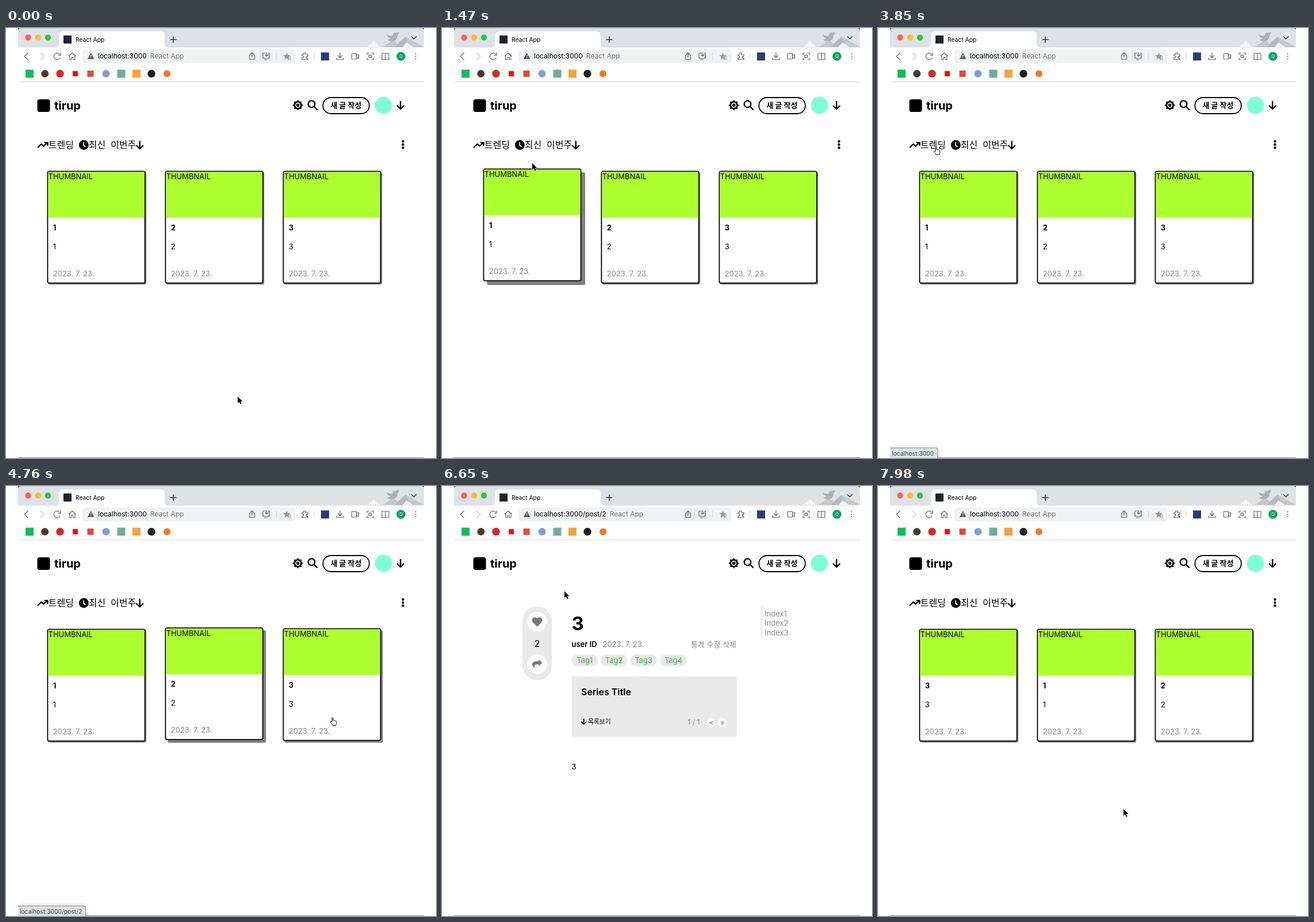
Write an HTML page that moves like this. It is 748 by 748 pixels and loops after 8000 ms.

```html
<!DOCTYPE html>
<html lang="ko">
<head>
<meta charset="utf-8">
<title>React App</title>
<style>
  html, body { margin: 0; width: 100%; height: 100%; overflow: hidden; background: #fff; }
  body, svg { font-family: Inter, "Noto Sans CJK KR", sans-serif; }
  svg { position: absolute; left: 0; top: 0; }
  text { font-size: 13px; }
  .bold { font-weight: 700; }
  .semi { font-weight: 600; }
  .muted { fill: #868686; }
  .panel { fill: #e9e9e9; }
  .green { fill: #3db43d; }
  .mid { text-anchor: middle; }
  .line { fill: none; stroke: #000; stroke-width: 2.3; stroke-linecap: round; stroke-linejoin: round; }
  .tool { fill: none; stroke: #5f6368; stroke-width: 1.2; stroke-linecap: round; stroke-linejoin: round; }
  .nav text { font-size: 16px; }
  #status {
    position: absolute; left: 21px; top: 730px; height: 17px; padding: 0 6px 0 3px;
    border: 1px solid #8d9197; border-left: 0; border-bottom: 0; border-radius: 0 4px 0 0;
    background: #dee1e6; box-shadow: 0 0 7px #0003; clip-path: inset(-12px -16px 0 0);
    font-size: 10.35px; line-height: 18px; color: #3c4043; white-space: nowrap;
  }
</style>
</head>
<body>
<svg width="748" height="748" viewBox="0 0 748 748">
  <defs>
    <path id="down" class="line" d="M0-6.5V6.5M-5.5 1L0 6.5L5.5 1"/>
  </defs>

  <!-- tab strip -->
  <path d="M21 0H727V34H21z" fill="#dee1e6"/>
  <path d="M21 .5H727" stroke="#c9ccd1"/>
  <path d="M21 0h4q-4 0-4 4zM727 0h-4q4 0 4 4z" fill="#444"/>
  <path d="M655 33L673 21L681 27L695 15L711 24L727 33z" fill="#c5c8cd"/>
  <path d="M676 33L695 16L704 33z" fill="#b5b8be"/>
  <path d="M628 33L640 23L651 33zM690 33L697 25L708 33z" fill="#f5f6f7"/>
  <path d="M662 11q6 4 11 2q0-5 5-5l6-1q-1 4-3 7q-1 9-10 9q-6 0-8-3q4 0 6-2q-6-2-7-7z" fill="#adb0b5"/>
  <circle cx="38.5" cy="16.5" r="5.2" fill="#ff5f57"/>
  <circle cx="56" cy="16.5" r="5.2" fill="#febc2e"/>
  <circle cx="73" cy="16.5" r="5.2" fill="#28c840"/>
  <path d="M85 34q7 0 7-7V13q0-7 7-7H269q7 0 7 7V27q0 7 7 7z" fill="#fff"/>
  <rect x="100" y="13" width="14" height="14" fill="#20232a"/>
  <text x="121" y="23.6" style="font-size:10.3px">React App</text>
  <path class="tool" stroke="#333" d="M286 20.3h10M291 15.3v10M705.5 15l4 4l4-4" style="stroke:#333;stroke-width:1.5"/>

  <!-- toolbar -->
  <rect x="133" y="37.5" width="371" height="24" rx="6" fill="#f0f1f3"/>
  <g class="tool">
    <path d="M38 43.5L32 49.3L38 55M93.5 46A5.7 5.7 0 1 0 94 52M91 47.5h4v-4.500M109.500 48.500L115.200 43.500L121 48.500M110.800 48V55h3v-4h3v4h3V48"/>
    <path d="M60.500 43.500L66.500 49.300L60.500 55" stroke="#c4c7cb"/>
    <path d="M426 47h-2.500v7.500h9V47H430M428 51v-8l-2.500 2.500M428 43l2.500 2.500M452 43.500h-5v9h11v-9h-1.500M449.500 55h5M453.500 43v6l-2.500-2.500M453.500 49l2.500-2.500"/>
    <path d="M515 46h3q-1-3 1.500-3t1.500 3h4v3.500q-3-1-3 1.500t3 1.500V55H515v-3q3 0 3-1.800T515 48.500z"/>
    <path d="M581 43v8M577.500 48l3.500 3.500l3.500-3.500M575 52v3h12v-3"/>
    <path d="M601.500 44.500h8v9.500h-8zM609.500 48l4-2v7l-4-2"/>
    <path d="M628 46.500v-3h3M636 43.500h3v3M639 52v3h-3M631 55h-3v-3"/>
    <circle cx="633.500" cy="49.300" r="2.500"/>
    <path d="M654 44h12v11h-12zM660 44v11"/>
  </g>
  <path d="M470.500 43v12M535.500 43v12" stroke="#d5d7da"/>
  <path d="M147.700 43.500L153.300 54H142z" fill="#505357"/>
  <path d="M147.700 47v3M147.700 51.300v1.300" stroke="#fff" stroke-width="1.200"/>
  <path d="M488.500 43l1.800 4l4.500.4l-3.400 3l1 4.500l-3.900-2.500l-3.900 2.500l1-4.500l-3.400-3l4.500-.4z" fill="#96999d"/>
  <path d="M490 50h6M490 52.500h6M490 55h6" stroke="#96999d"/>
  <rect x="548" y="42.500" width="14" height="14" fill="#2b3a7c"/>
  <circle cx="687" cy="49.300" r="7.800" fill="#0ba360"/>
  <text class="mid" x="687" y="52.300" fill="#fff" style="font-size:8px">Q</text>
  <g fill="#5f6368"><circle cx="712.500" cy="45" r="1"/><circle cx="712.500" cy="49.300" r="1"/><circle cx="712.500" cy="53.500" r="1"/></g>
  <text y="53.300" x="160" style="font-size:12px"><tspan id="url"></tspan><tspan dx="6" fill="#777">React App</tspan></text>

  <!-- bookmarks -->
  <rect x="34" y="72.500" width="14" height="14" fill="#0abf5b"/>
  <circle cx="67.700" cy="79.500" r="6.500" fill="#4b3a29"/>
  <circle cx="94" cy="79.500" r="6.700" fill="#d62828"/>
  <rect x="116" y="75" width="9" height="9" fill="#f00"/>
  <rect x="141.500" y="74" width="11" height="11" fill="#e24a3b"/>
  <circle cx="174" cy="79.500" r="6.500" fill="#7f9ed0"/>
  <rect x="193.500" y="72.500" width="14" height="14" fill="#74aa9c"/>
  <rect x="220" y="72.500" width="14" height="14" fill="#f5a33a"/>
  <circle cx="253" cy="79.500" r="6.700" fill="#1b1f23"/>
  <circle cx="280" cy="79.500" r="6" fill="#f37726"/>
  <path d="M21 93.700H727" stroke="#dcdee1" stroke-width="1.200"/>
  <path d="M21 747.500H727" stroke="#8a8a8a"/>

  <!-- site header -->
  <rect x="54.500" y="124" width="22" height="22" rx="4"/>
  <text class="bold" x="84" y="142" style="font-size:20px">tirup</text>
  <g id="sun" transform="translate(507.700 134.300)">
    <circle r="5.700" fill="none" stroke="#000" stroke-width="2.500"/><circle r="2.800"/>
  </g>
  <g class="line"><circle cx="531.500" cy="132.300" r="5.800"/><path d="M536 136.800L541 141.800"/></g>
  <rect x="551.300" y="121" width="80.700" height="28" rx="14" fill="none" stroke="#000" stroke-width="1.800"/>
  <text class="bold mid" x="591.500" y="139.300">새 글 작성</text>
  <circle cx="656.500" cy="134.500" r="15" fill="#7fffd4"/>
  <use href="#down" x="686.300" y="134.500"/>

  <g id="home">
    <g class="nav">
      <path class="line" d="M55.500 207.500L61.500 201.800L65.500 205.300L72 199.500M67.500 199.300H72.500V204"/>
      <text x="73.700" y="208.600">트렌딩</text>
      <circle cx="135.300" cy="203.500" r="8.500"/>
      <path d="M135 198.500V204L138.500 206.500" fill="none" stroke="#fff" stroke-width="1.600"/>
      <text x="143.700" y="208.600">최신</text>
      <text x="182" y="208.600">이번주</text>
      <use href="#down" x="232.800" y="203.700"/>
      <circle cx="690.500" cy="197.300" r="2.200"/><circle cx="690.500" cy="202.800" r="2.200"/><circle cx="690.500" cy="208.300" r="2.200"/>
    </g>
    <g id="cards"></g>
  </g>

  <g id="post">
    <rect class="panel" x="140" y="209.500" width="51" height="128" rx="25.500"/>
    <g fill="#fff"><circle cx="165.500" cy="236" r="17.200"/><circle cx="165.500" cy="309.800" r="17.200"/></g>
    <path d="M165.500 244.500l-7.500-7.500c-3-4 0-9 4-8.500q2.500.3 3.500 2.200q1-1.900 3.500-2.200c4-.5 7 4.500 4 8.500z" fill="#777"/>
    <path d="M168 301.500l6.500 6l-6.500 6v-3.500q-6-.5-7 2.500q-.5 2 .8 4.500q-5.300-3-4.800-7.500q1-5 11-4.700z" fill="#777"/>
    <text id="likes" class="mid" x="165.500" y="279.500" style="font-size:16px"></text>
    <text class="bold" x="225.500" y="251" style="font-size:33px">3</text>
    <text class="semi" x="225.500" y="280">user ID</text>
    <text class="muted" x="279.500" y="280">2023. 7. 23.</text>
    <text class="muted" x="433" y="280">통계 수정 삭제</text>
    <g id="tags"></g>
    <rect class="panel" x="225.500" y="330.700" width="287" height="105.500" rx="4"/>
    <text class="semi" x="242" y="364" style="font-size:16px">Series Title</text>
    <use href="#down" transform="translate(246.700 410) scale(.68)"/>
    <text x="254" y="413.700" style="font-size:10.800px">목록보기</text>
    <text class="muted" x="427.500" y="415" style="font-size:12px">1 / 1</text>
    <g fill="#fff"><circle cx="468.500" cy="411.300" r="7.700"/><circle cx="487.800" cy="411.300" r="7.700"/></g>
    <g class="bold green mid"><text x="468.500" y="415" style="font-size:11px">&lt;</text><text x="487.800" y="415" style="font-size:11px">&gt;</text></g>
    <text x="225.500" y="492.500">3</text>
    <path d="M556 209.500V266.500" stroke="#dcdcdc" stroke-width="1.700"/>
    <g class="muted"><text x="561" y="227">Index1</text><text x="561" y="243.300">Index2</text><text x="561" y="259.600">Index3</text></g>
  </g>

  <g id="cursor">
    <path id="arrow" d="M0 0V11.500L2.700 9.200L4.600 13.500L6.800 12.500L5 8.400H8.500z" stroke="#fff" stroke-width="1.300" paint-order="stroke"/>
    <path id="hand" transform="translate(-5 -.5)" fill="#fff" stroke="#000" d="M4 1.200c0-1 2-1 2 0v4.300c.3-.8 1.800-.7 2 .1c.5-.5 1.800-.3 1.900.5c.7-.4 1.900-.1 1.900.9v3.200c0 1.500-1 2-1 3.800H5.300c-.4-1.600-2.600-3.400-3.800-5.200c-.8-1.200.7-2 1.600-1.100L4 8.600z"/>
  </g>
</svg>
<div id="status"></div>

<script>
const LOOP = 8000, STEP = 70, HOST = 'localhost:3000';
const $ = id => document.getElementById(id);
const clamp = v => Math.max(0, Math.min(1, v));
const easeOut = p => 1 - (1 - clamp(p)) ** 2;
const within = (t, spans) => spans.some(([from, to]) => t >= from && t < to);
const show = (el, on) => { el.style.display = on ? '' : 'none'; };

// time, x, y of the pointer tip
const route = [
  [0, 403, 641], [490, 403, 641], [560, 408, 630], [630, 414, 619], [700, 414, 619],
  [840, 400, 560], [980, 320, 430], [1120, 200, 360], [1400, 165, 280], [1470, 157, 235],
  [1540, 160, 214], [1750, 340, 320], [1960, 540, 330], [2170, 570, 300], [2240, 570, 300],
  [2590, 190, 208], [3080, 152, 210], [3640, 101, 207], [3850, 101, 207], [4200, 150, 300],
  [4480, 330, 380], [4690, 475, 406], [4760, 568, 403], [4970, 568, 403], [5180, 584, 401],
  [5460, 520, 370], [5950, 163, 232], [6370, 163, 232], [6650, 213, 183], [6930, 88, 138],
  [7070, 88, 138], [7280, 140, 225], [7420, 230, 320], [7560, 350, 460], [7700, 427, 562], [LOOP, 427, 562]
];
const handSpans = [[1050, 1470], [1700, 2310], [2590, 3920], [4130, 5040], [5950, 6400], [6860, 7140], [7350, 7560]];
const hovers = [
  [[1050, 1480], [4150, 4360], [7320, 7440]],
  [[1700, 1890], [4360, 4700], [7440, 7540]],
  [[1890, 2350], [4720, 4970]]
];
const statuses = [
  [2660, 4200, ''], [4200, 4410, '/post/0'], [4410, 4690, '/post/1'], [4690, 5480, '/post/2'],
  [6930, 7350, ''], [7350, 7490, '/post/2'], [7490, 7800, '/post/0']
];
const POST_OPEN = 4970, POST_CLOSE = 7070, LIKES = [6090, 6230];

$('sun').innerHTML += Array.from({ length: 8 }, (_, i) =>
  `<path d="M-2.600-6L0-9.300L2.600-6z" transform="rotate(${i * 45})"/>`).join('');

$('tags').innerHTML = [225.5, 275.5, 327, 379].map((x, i) => {
  const w = i ? 47 : 45.5;
  return `<rect class="panel" x="${x}" y="293" width="${w}" height="20.500" rx="10.250"/>
    <text class="green mid" x="${x + w / 2}" y="308">Tag${i + 1}</text>`;
}).join('');

const cards = [0, 1, 2].map(i => {
  const card = document.createElementNS('http://www.w3.org/2000/svg', 'g');
  card.innerHTML = `<rect class="shadow" width="171" height="196" rx="3" fill="#808080"/>
    <rect x=".900" y=".900" width="169.200" height="194.200" rx="2.500" fill="#fff" stroke="#000" stroke-width="1.800"/>
    <path d="M1.800 1.800H169.200V81.500H1.800z" fill="#adff2f"/>
    <text x="2" y="14.700">THUMBNAIL</text>
    <text class="num bold" x="10.300" y="103.500"></text>
    <text class="num" x="10.300" y="136.500"></text>
    <text class="muted" x="10.300" y="183.300">2023. 7. 23.</text>`;
  $('cards').append(card);
  return { card, shadow: card.querySelector('.shadow'), nums: card.querySelectorAll('.num'), x: 71.5 + 205 * i };
});

function liftAt(t, spans) {
  return Math.max(...spans.map(([enter, leave]) =>
    easeOut((Math.min(t, leave) - enter) / 300) * (1 - easeOut((t - leave) / 300))));
}

function pointerAt(t) {
  const next = Math.max(1, route.findIndex(([time]) => time > t));
  const [t0, x0, y0] = route[next - 1], [t1, x1, y1] = route[next];
  const p = (t - t0) / (t1 - t0);
  return [x0 + (x1 - x0) * p, y0 + (y1 - y0) * p];
}

function render(t) {
  const onPost = t >= POST_OPEN && t < POST_CLOSE;
  show($('home'), !onPost);
  show($('post'), onPost);
  $('url').textContent = HOST + (onPost ? '/post/2' : '');
  $('likes').textContent = LIKES.filter(time => t >= time).length;

  const order = t < POST_CLOSE ? [1, 2, 3] : [3, 1, 2];
  cards.forEach(({ card, shadow, nums, x }, i) => {
    const lift = liftAt(t, hovers[i]), offset = 1.7 + 4.9 * lift;
    card.setAttribute('transform', `translate(${x} ${248.5 - 4 * lift})`);
    shadow.setAttribute('transform', `translate(${offset} ${offset})`);
    nums.forEach(num => { num.textContent = order[i]; });
  });

  const status = statuses.filter(([from]) => t >= from).pop();
  $('status').textContent = HOST + (status ? status[2] : '');
  $('status').style.opacity = status ? 1 - clamp((t - status[1]) / 140) : 0;

  const isHand = within(t, handSpans);
  show($('hand'), isHand);
  show($('arrow'), !isHand);
  $('cursor').setAttribute('transform', `translate(${pointerAt(t)})`);
}

function tick() {
  const t = performance.now() % LOOP;
  render(Math.floor(t / STEP) * STEP);
  requestAnimationFrame(tick);
}
tick();
</script>
</body>
</html>
```
